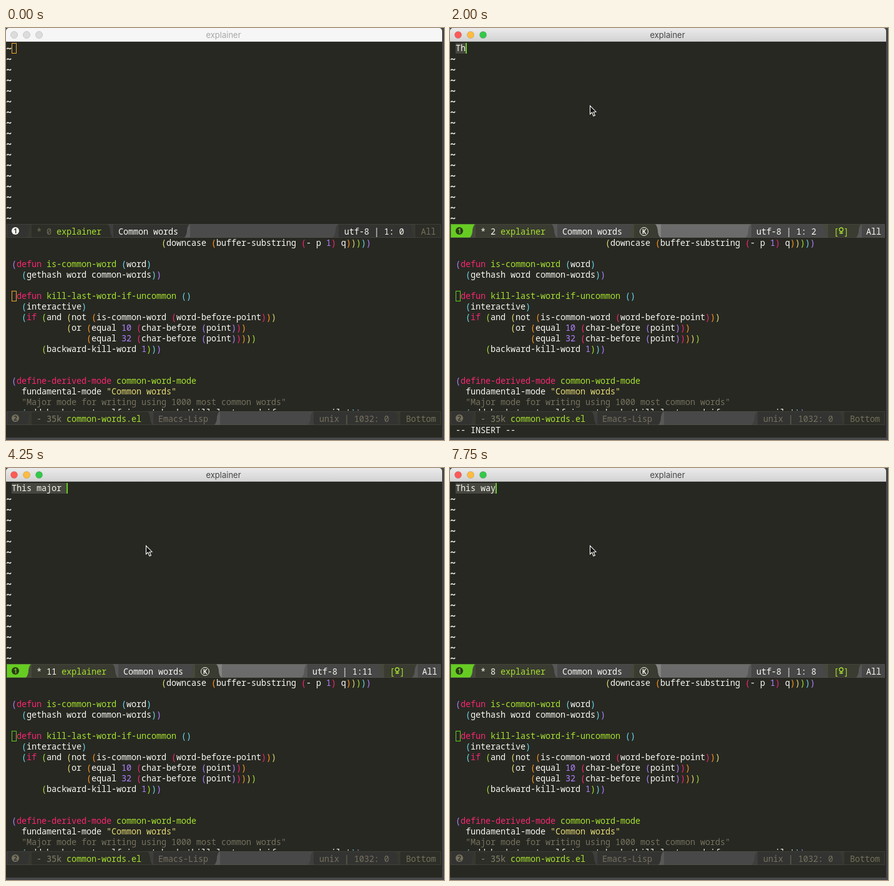
These frames come from a looping animation (702x660 px, 8 s). An HTML page with a canvas:

```html
<!DOCTYPE html>
<html lang="en">
<head>
<meta charset="utf-8">
<title>explainer</title>
<style>
html, body { margin: 0; width: 100%; height: 100%; overflow: hidden; background: #272822; }
canvas { display: block; width: 702px; height: 660px; }
</style>
</head>
<body>
<canvas id="stage" width="702" height="660"></canvas>
<script>
const ctx = document.getElementById('stage').getContext('2d');
const LOOP = 8000, CELL = 8, LINE = 17, LEFT = 9;
const MONO = '500 13.5px "Noto Sans Mono", monospace';
const BG = '#272822', WHITE = '#f8f8f2', GREEN = '#a6e22e', PINK = '#f92672',
  PURPLE = '#ae81ff', YELLOW = '#e6db74', DIM = '#75715e',
  INSERT = '#66cc22', ORANGE = '#f0a830';
const RAINBOW = [PURPLE, '#66d9ef', GREEN, YELLOW, '#fd971f', PINK, PURPLE];
const DARK = '#333331', OLIVE = '#2d2e27', MID = '#474747', OLIVE_ON = '#3a3b31';

// [row, column, text, paren depth at line start]
const CODE = [
  [0, 30, '(downcase (buffer-substring (- p 1) q)))))', 3],
  [2, 0, '(defun is-common-word (word)', 0],
  [3, 2, '(gethash word common-words))', 1],
  [5, 1, 'defun kill-last-word-if-uncommon ()', 1],
  [6, 2, '(interactive)', 1],
  [7, 2, '(if (and (not (is-common-word (word-before-point)))', 1],
  [8, 11, '(or (equal 10 (char-before (point)))', 3],
  [9, 15, '(equal 32 (char-before (point)))))', 4],
  [10, 6, '(backward-kill-word 1)))', 2],
  [13, 0, '(define-derived-mode common-word-mode', 0],
  [14, 2, 'fundamental-mode "Common words"', 1],
  [15, 2, '"Major mode for writing using 1000 most common words"', 1],
  [16, 2, "(add-hook 'post-self-insert-hook 'kill-last-word-if-uncommon nil t))", 1]
];

// [start time, buffer text]
const TYPING = [
  [0, ''], [2000, 'Th'], [2250, 'This'], [2500, 'This '], [3250, 'This maj'],
  [3500, 'This major'], [3750, 'This major '], [4000, 'This major'],
  [4250, 'This major '], [6250, 'This '], [7500, 'This w'], [7750, 'This way']
];

function rect(x, y, w, h, color) {
  ctx.fillStyle = color;
  ctx.fillRect(x, y, w, h);
}

function box(x, y, w, h, color) {
  ctx.strokeStyle = color;
  ctx.lineWidth = 1;
  ctx.strokeRect(x + .5, y + .5, w - 1, h - 1);
}

function disc(x, y, r, fill, stroke) {
  ctx.beginPath();
  ctx.arc(x, y, r, 0, Math.PI * 2);
  if (fill) { ctx.fillStyle = fill; ctx.fill(); }
  if (stroke) { ctx.strokeStyle = stroke; ctx.lineWidth = 1; ctx.stroke(); }
}

function mono(str, x, y, color) {
  ctx.font = MONO;
  ctx.textAlign = 'center';
  ctx.fillStyle = color;
  [...str].forEach((ch, i) => {
    if (ch !== ' ') ctx.fillText(ch, x + (i + .5) * CELL, y);
  });
}

function label(str, x, y, font, color) {
  ctx.font = font;
  ctx.textAlign = 'center';
  ctx.fillStyle = color;
  ctx.fillText(str, x, y);
}

function codeLine([row, col, str, depth]) {
  let x = LEFT + col * CELL, prev = '';
  for (const tok of str.match(/"[^"]*"|[()]|\s+|[^\s()"]+/g)) {
    let color = WHITE;
    if (tok === '(') color = RAINBOW[depth++];
    else if (tok === ')') color = RAINBOW[--depth];
    else if (tok[0] === '"') color = row === 15 ? DIM : YELLOW;
    else if (/^\d+$/.test(tok)) color = PURPLE;
    else if (/^(defun|if|define-derived-mode)$/.test(tok)) color = PINK;
    else if (/^def/.test(prev)) color = GREEN;
    mono(tok, x, 349 + row * LINE, color);
    x += tok.length * CELL;
    if (tok.trim()) prev = tok;
  }
}

function lighten(hex) {
  const part = i => Math.min(255, Math.round(parseInt(hex.substr(i, 2), 16) * 1.22));
  return `rgb(${part(1)},${part(3)},${part(5)})`;
}

// Slanted wave edge that ends at x
function separator(x, y, h, from, to, dir) {
  const top = dir === '/' ? x : x - 10, bottom = dir === '/' ? x - 10 : x;
  const mid = y + h / 2;
  rect(x - 10, y, 10, h, from);
  ctx.beginPath();
  ctx.moveTo(top, y);
  ctx.bezierCurveTo((top + x - 5) / 2, y, x - 5, mid - 4, x - 5, mid);
  ctx.bezierCurveTo(x - 5, mid + 4, (bottom + x - 5) / 2, y + h, bottom, y + h);
  ctx.lineTo(x, y + h);
  ctx.lineTo(x, y);
  ctx.fillStyle = lighten(to);
  ctx.fill();
}

function modeLine(y, h, parts) {
  parts.forEach(([x, color], i) => {
    const end = i + 1 < parts.length ? parts[i + 1][0] : 697;
    rect(x, y, end - x, h, color);
  });
  parts.slice(1).forEach(([x, color, dir], i) => separator(x, y, h, parts[i][1], color, dir));
  ctx.globalAlpha = .4;
  box(1, y, 696, h, '#55554c');
  ctx.globalAlpha = 1;
}

function badge(n, y, fill, ink) {
  disc(15, y, 6, fill);
  label(n, 15, y + 3.6, 'bold 10px "Noto Sans", sans-serif', ink);
}

function bulb(x, y) {
  ctx.beginPath();
  ctx.arc(x, y - 2, 3, 0, Math.PI * 2);
  ctx.moveTo(x, y + 1);
  ctx.lineTo(x, y + 5);
  ctx.moveTo(x - 3, y + 3.5);
  ctx.lineTo(x + 3, y + 3.5);
  ctx.strokeStyle = GREEN;
  ctx.lineWidth = 1.3;
  ctx.stroke();
}

function activeLine(inserting, len) {
  const pos = 'utf-8 | 1:' + String(len).padStart(2);
  const shift = len > 9 ? CELL : 0, base = 331;
  if (inserting) {
    modeLine(314, 22, [
      [1, INSERT], [41, OLIVE_ON, '/'], [172 + shift, MID, '\\'], [295 + shift, OLIVE_ON, '/'],
      [338 + shift, '#6b6b6b', '\\'], [483, MID, '/'], [606, OLIVE_ON, '\\'], [660, MID, '/']
    ]);
    badge('1', 325, '#2b3a18', INSERT);
    disc(311 + shift, 326, 6.5, null, WHITE);
    label('K', 311 + shift, 329.8, 'bold 10px "Noto Sans", sans-serif', WHITE);
    mono(pos, 491, base, WHITE);
    mono('[ ]', 615, base, GREEN);
    bulb(627, 325);
    mono('All', 667, base, WHITE);
  } else {
    modeLine(314, 22, [
      [1, DARK], [41, OLIVE, '/'], [172, DARK, '\\'], [295, '#4b4b4b', '/'],
      [533, DARK, '/'], [656, OLIVE, '\\']
    ]);
    badge('1', 325, WHITE, DARK);
    mono(pos, 542, base, WHITE);
    mono('All', 665, base, DIM);
  }
  mono('* ' + len, 49, base, inserting ? WHITE : DIM);
  mono('explainer', 81 + shift, base, GREEN);
  mono('Common words', 180 + shift, base, WHITE);
}

function inactiveLine() {
  modeLine(614, 22, [
    [1, DARK], [41, OLIVE, '/'], [236, DARK, '\\'], [343, '#484848', '/'],
    [493, DARK, '/'], [632, OLIVE, '\\']
  ]);
  badge('2', 625, DIM, DARK);
  mono('- 35k', 49, 631, '#85826f');
  mono('common-words.el', 97, 631, GREEN);
  mono('Emacs-Lisp', 244, 631, DIM);
  mono('unix | 1032: 0', 502, 631, DIM);
  mono('Bottom', 641, 631, DIM);
}

function titleBar(focused) {
  rect(0, 0, 702, 22, '#454545');
  const fade = ctx.createLinearGradient(0, 0, 0, 22);
  fade.addColorStop(0, focused ? '#ebebeb' : '#f6f6f6');
  fade.addColorStop(1, focused ? '#d2d2d2' : '#f6f6f6');
  ctx.fillStyle = fade;
  ctx.beginPath();
  ctx.moveTo(0, 22);
  ctx.arcTo(0, 0, 5, 0, 5);
  ctx.arcTo(699, 0, 699, 5, 5);
  ctx.lineTo(699, 22);
  ctx.fill();
  rect(0, 21, 699, 1, focused ? '#b4b4b4' : '#dadada');
  ['#fc5b57', '#fdbc40', '#34c84a'].forEach((color, i) =>
    disc(13 + i * 20, 11, 5.5, focused ? color : '#dcdcdc',
      focused ? 'rgba(0,0,0,.14)' : '#c9c9c9'));
  label('explainer', 348.5, 16, '13px Inter, sans-serif', focused ? '#444' : '#a6a6a6');
}

function tilde(y) {
  ctx.beginPath();
  ctx.moveTo(1.5, y + 1.5);
  ctx.bezierCurveTo(3, y - 3.5, 6, y + 4.5, 8, y - .8);
  ctx.strokeStyle = WHITE;
  ctx.lineWidth = 1.5;
  ctx.stroke();
}

function pointer(x, y) {
  ctx.beginPath();
  [[.5, .5], [.5, 14], [3.6, 11.2], [6, 17], [8.4, 16], [6, 10.5], [10, 10.2]]
    .forEach(([dx, dy]) => ctx.lineTo(x + dx, y + dy));
  ctx.closePath();
  ctx.fillStyle = '#111';
  ctx.fill();
  ctx.strokeStyle = '#fff';
  ctx.lineWidth = 1.1;
  ctx.stroke();
}

function draw(t) {
  const focused = t >= 750, inserting = t >= 1750;
  const text = TYPING.filter(([at]) => t >= at).pop()[1];
  const caret = LEFT + text.length * CELL;

  rect(0, 0, 702, 660, BG);
  titleBar(focused);

  for (let row = text ? 1 : 0; row < 17; row++) tilde(32.5 + row * LINE);
  rect(LEFT, 24, caret - LEFT, LINE, '#46473f');
  mono(text, LEFT, 37, WHITE);
  if (inserting) rect(caret, 24, 2, LINE, INSERT);
  else if (focused) rect(LEFT, 24, CELL, LINE, ORANGE);
  else box(LEFT, 24, CELL, LINE, ORANGE);

  CODE.forEach(codeLine);
  box(LEFT, 421, CELL, LINE, inserting ? INSERT : ORANGE);
  activeLine(inserting, text.length);
  rect(0, 613, 699, 47, BG);
  inactiveLine();
  if (inserting && t < 2250) mono('-- INSERT --', LEFT, 649, WHITE);

  rect(699, 22, 3, 638, '#454647');
  rect(0, 656, 702, 4, '#454647');

  if (t >= 500) pointer(224, 124);
  else if (t >= 250) pointer(228, 124.5);
}

function tick() {
  draw(performance.now() % LOOP);
  requestAnimationFrame(tick);
}
tick();
</script>
</body>
</html>
```
